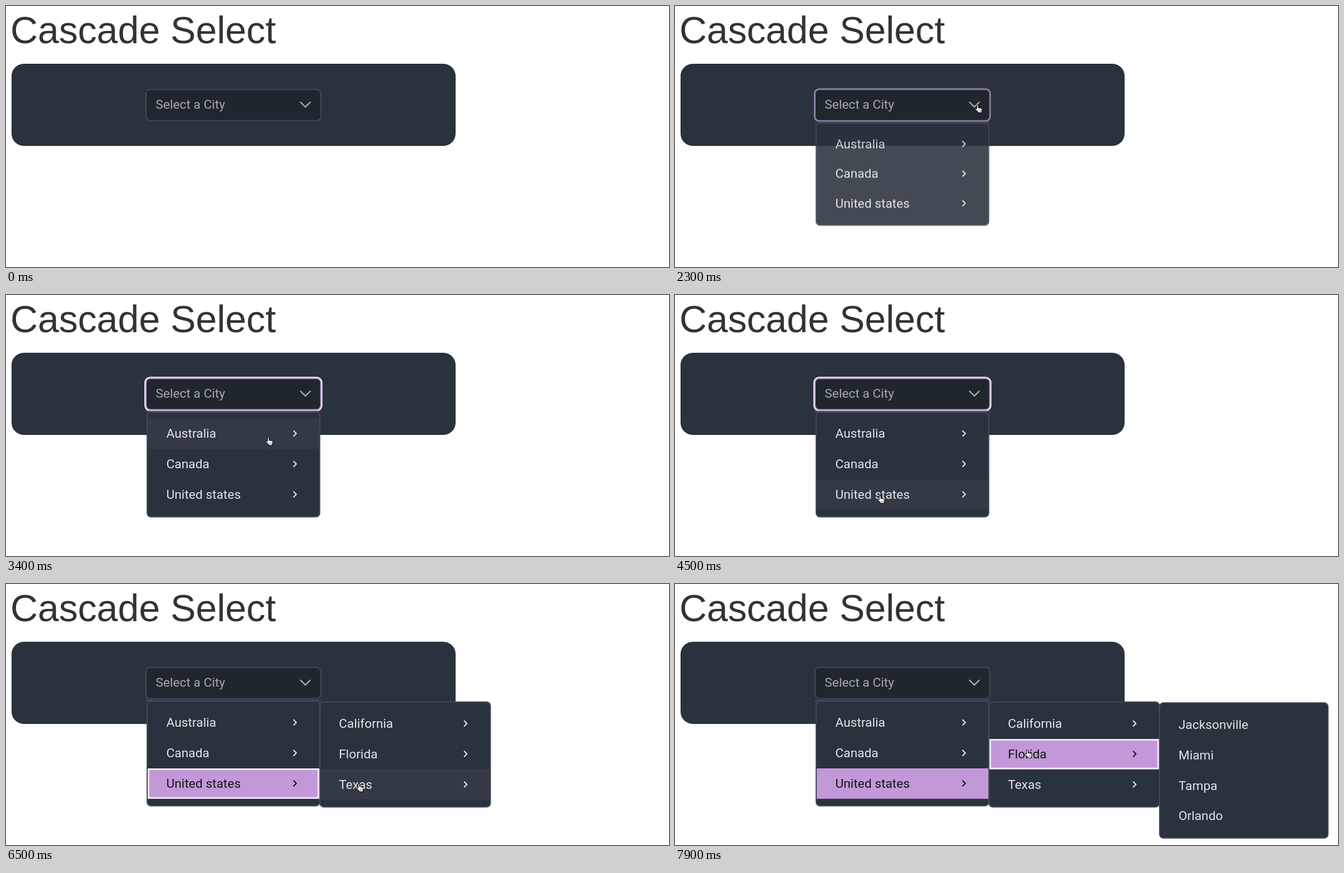
An HTML page that plays this animation: 1193 by 470 pixels, repeating every 8000 ms.

```html
<!DOCTYPE html>
<html lang="en">
<head>
<meta charset="utf-8">
<title>Cascade Select</title>
<style>
html, body { margin: 0; width: 100%; height: 100%; overflow: hidden; background: #fff; }
svg { display: block; width: 1193px; height: 470px; }
text { font: 22.8px Roboto, sans-serif; }
h1, .title { font: 68.2px "Liberation Sans", Arial, sans-serif; fill: #333; }

.panel { fill: #2a323d; stroke: #3f4b5b; stroke-width: 2; }
.row { fill: #e3e4e6; stroke: none; }
.row path, .caret { fill: none; stroke: #e3e4e6; stroke-width: 2.1; stroke-linecap: round; stroke-linejoin: round; }
.caret { stroke: #a6a8ab; stroke-width: 2.4; }
.hover { fill: #333a45; }
.pick { fill: #c298d8; }
.edge { fill: none; stroke: #f0e6f5; stroke-width: 3; }

/* one shared 8 s clock; 100 ms = 1.25% */
.anim { animation: 8s step-end infinite; }
.border { fill: #20262e; stroke: #3f4b5b; stroke-width: 2; animation-name: border; }
.ring { fill: none; stroke: #f0e6f5; stroke-width: 0; animation-name: ring; }
.menu { transform-origin: 0 209px; animation-name: menu; }
.hover1 { animation-name: hover1; }
.hover2 { animation-name: hover2; }
.on1 { animation-name: on1; }
.edge1 { animation-name: edge1; }
.dark1 { animation-name: dark1; }
.dark1 path { animation-name: darkLine1; }
.sub { animation-name: sub; }
.on2 { animation-name: on2; }
.edge2 { animation-name: edge2; }
.dark2 { animation-name: dark2; }
.dark2 path { animation-name: darkLine2; }
.last { animation-name: last; }
.cursor { animation-name: move; }
.arrow { animation-name: arrow; }
.hand { animation-name: hand; }

@keyframes border {
  0%, 62.5% { stroke: #3f4b5b; }
  28.75% { stroke: #8a78a3; }
  30% { stroke: #c298d8; }
  62.5% { stroke: #b48fca; }
  63.75% { stroke: #675f7f; }
  65%, 100% { stroke: #3f4b5b; }
}
@keyframes ring {
  0% { stroke-width: 0; stroke: #f0e6f5; }
  28.75% { stroke-width: 4; stroke: #9a8cae; }
  30% { stroke-width: 6; stroke: #f0e6f5; }
  62.5% { stroke-width: 5.4; stroke: #d2c9d9; }
  63.75% { stroke-width: 3; stroke: #656877; }
  65%, 100% { stroke-width: 0; stroke: #3f4b5b; }
}
@keyframes menu {
  0% { opacity: 0; transform: scaleY(.8); }
  28.75% { opacity: .88; transform: scaleY(.975); }
  30%, 100% { opacity: 1; transform: none; }
}
@keyframes hover1 {
  0% { opacity: 0; transform: translateY(0); }
  36.25% { opacity: 1; transform: translateY(0); }
  45% { opacity: 1; transform: translateY(54.8px); }
  50% { opacity: 1; transform: translateY(109.6px); }
  62.5%, 100% { opacity: 0; transform: translateY(109.6px); }
}
@keyframes hover2 {
  0% { opacity: 0; transform: translateY(54.8px); }
  77.5% { opacity: 1; transform: translateY(54.8px); }
  85% { opacity: 1; transform: translateY(0); }
  96.25%, 100% { opacity: 0; transform: translateY(0); }
}
@keyframes on1 { 0% { opacity: 0; } 62.5%, 100% { opacity: 1; } }
@keyframes edge1 {
  0% { opacity: 0; }
  62.5% { opacity: .4; }
  63.75% { opacity: .9; }
  65% { opacity: 1; }
  96.25%, 100% { opacity: 0; }
}
@keyframes dark1 { 0% { fill: #e3e4e6; } 62.5%, 100% { fill: #151515; } }
@keyframes darkLine1 { 0% { stroke: #e3e4e6; } 62.5%, 100% { stroke: #151515; } }
@keyframes sub { 0% { opacity: 0; } 65%, 100% { opacity: 1; } }
@keyframes on2 { 0% { opacity: 0; } 96.25% { opacity: .8; } 98.75%, 100% { opacity: 1; } }
@keyframes edge2 { 0% { opacity: 0; } 96.25% { opacity: .8; } 98.75%, 100% { opacity: 1; } }
@keyframes dark2 { 0% { fill: #e3e4e6; } 96.25%, 100% { fill: #151515; } }
@keyframes darkLine2 { 0% { stroke: #e3e4e6; } 96.25%, 100% { stroke: #151515; } }
@keyframes last { 0% { opacity: 0; } 98.75%, 100% { opacity: 1; } }
@keyframes arrow { 0% { opacity: 1; } 15%, 100% { opacity: 0; } }
@keyframes hand { 0% { opacity: 0; } 15%, 100% { opacity: 1; } }
@keyframes move {
  0% { opacity: 0; transform: translate(239px, 8px); }
  3.75% { opacity: 1; transform: translate(239px, 8px); animation-timing-function: steps(4); }
  8.75% { opacity: 1; transform: translate(400px, 90px); animation-timing-function: steps(4); }
  13.75% { opacity: 1; transform: translate(514px, 146px); animation-timing-function: steps(3); }
  17.5% { opacity: 1; transform: translate(539.5px, 177px); }
  32.5% { opacity: 1; transform: translate(539.5px, 177px); animation-timing-function: steps(4); }
  37.5% { opacity: 1; transform: translate(490px, 244px); }
  42.5% { opacity: 1; transform: translate(467px, 255.5px); animation-timing-function: steps(3); }
  46.25% { opacity: 1; transform: translate(410px, 307px); }
  47.5% { opacity: 1; transform: translate(410px, 307px); animation-timing-function: steps(4); }
  52.5% { opacity: 1; transform: translate(367px, 359px); }
  56.25% { opacity: 1; transform: translate(364px, 360px); }
  71.25% { opacity: 1; transform: translate(364px, 360px); animation-timing-function: steps(6); }
  78.75% { opacity: 1; transform: translate(632px, 359px); }
  81.25% { opacity: 1; transform: translate(630px, 359px); }
  82.5% { opacity: 1; transform: translate(630px, 359px); animation-timing-function: steps(4); }
  87.5%, 100% { opacity: 1; transform: translate(629px, 298px); }
}
</style>
</head>
<body>
<svg viewBox="0 0 1193 470">
  <text class="title" x="8" y="67">Cascade Select</text>
  <rect x="10" y="104" width="799" height="148" rx="22" fill="#2a323d"/>

  <rect class="anim ring" x="252" y="150.2" width="314.4" height="56.3" rx="7.5"/>
  <rect class="anim border" x="252" y="150.2" width="314.4" height="56.3" rx="7.5"/>
  <text x="269.3" y="185.3" fill="#a6a8ab">Select a City</text>
  <path class="caret" d="M530.2 173.3l8.5 8.5 8.5-8.5"/>

  <g class="anim menu">
    <rect x="251" y="208.6" width="316" height="2.4" fill="#3f4b5b"/>
    <rect class="panel" x="254" y="211" width="310.5" height="188.5" rx="7"/>
    <rect class="anim hover hover1" x="255" y="222.3" width="308.5" height="54.8"/>
    <rect class="anim pick on1" x="255" y="332" width="308.8" height="54.8"/>
    <rect class="anim edge edge1" x="256.5" y="333.5" width="305.6" height="51.8"/>
    <g class="row" transform="translate(288.5 257.4)"><text>Australia</text><path d="M229.2-12.7l4.7 4.7-4.7 4.7"/></g>
    <g class="row" transform="translate(288.5 312.2)"><text>Canada</text><path d="M229.2-12.7l4.7 4.7-4.7 4.7"/></g>
    <g class="anim row dark1" transform="translate(288.5 367)"><text>United states</text><path class="anim" d="M229.2-12.7l4.7 4.7-4.7 4.7"/></g>
  </g>

  <g class="anim sub">
    <rect class="panel" x="565" y="212.4" width="306.6" height="189.2" rx="7"/>
    <rect class="anim hover hover2" x="566" y="279" width="304.6" height="54.8"/>
    <rect class="anim pick on2" x="566" y="279" width="304.6" height="54.8"/>
    <rect class="anim edge edge2" x="567.2" y="280.6" width="302" height="51.6"/>
    <g class="row" transform="translate(599 259.2)"><text>California</text><path d="M225.7-12.7l4.7 4.7-4.7 4.7"/></g>
    <g class="anim row dark2" transform="translate(599 314)"><text>Florida</text><path class="anim" d="M225.7-12.7l4.7 4.7-4.7 4.7"/></g>
    <g class="row" transform="translate(599 368.9)"><text>Texas</text><path d="M225.7-12.7l4.7 4.7-4.7 4.7"/></g>
  </g>

  <g class="anim last">
    <rect class="panel" x="872" y="214" width="303" height="243.5" rx="7"/>
    <g class="row">
      <text x="906" y="261">Jacksonville</text>
      <text x="906" y="315.8">Miami</text>
      <text x="906" y="370.6">Tampa</text>
      <text x="906" y="425.4">Orlando</text>
    </g>
  </g>

  <g class="anim cursor" fill="#fff" stroke="#000">
    <path class="anim arrow" d="M.7 1v14.6l3.6-3.3 2.3 5.2 2.4-1-2.3-5.1h5z"/>
    <g class="anim hand">
      <path d="M3.6 8.5V2q0-1.4 1.3-1.4T6.2 2v4.2l5.4 1q1.6.4 1.6 2l-.7 3.6v2.2H5.2v-2L1 9.4q-.6-1.2.5-1.6.9-.2 2.1.7z"/>
      <path d="M7.4 10.5v2.2M9.2 10.5v2.2M11 10.5v2.2" stroke-width=".6"/>
    </g>
  </g>
</svg>
</body>
</html>
```
